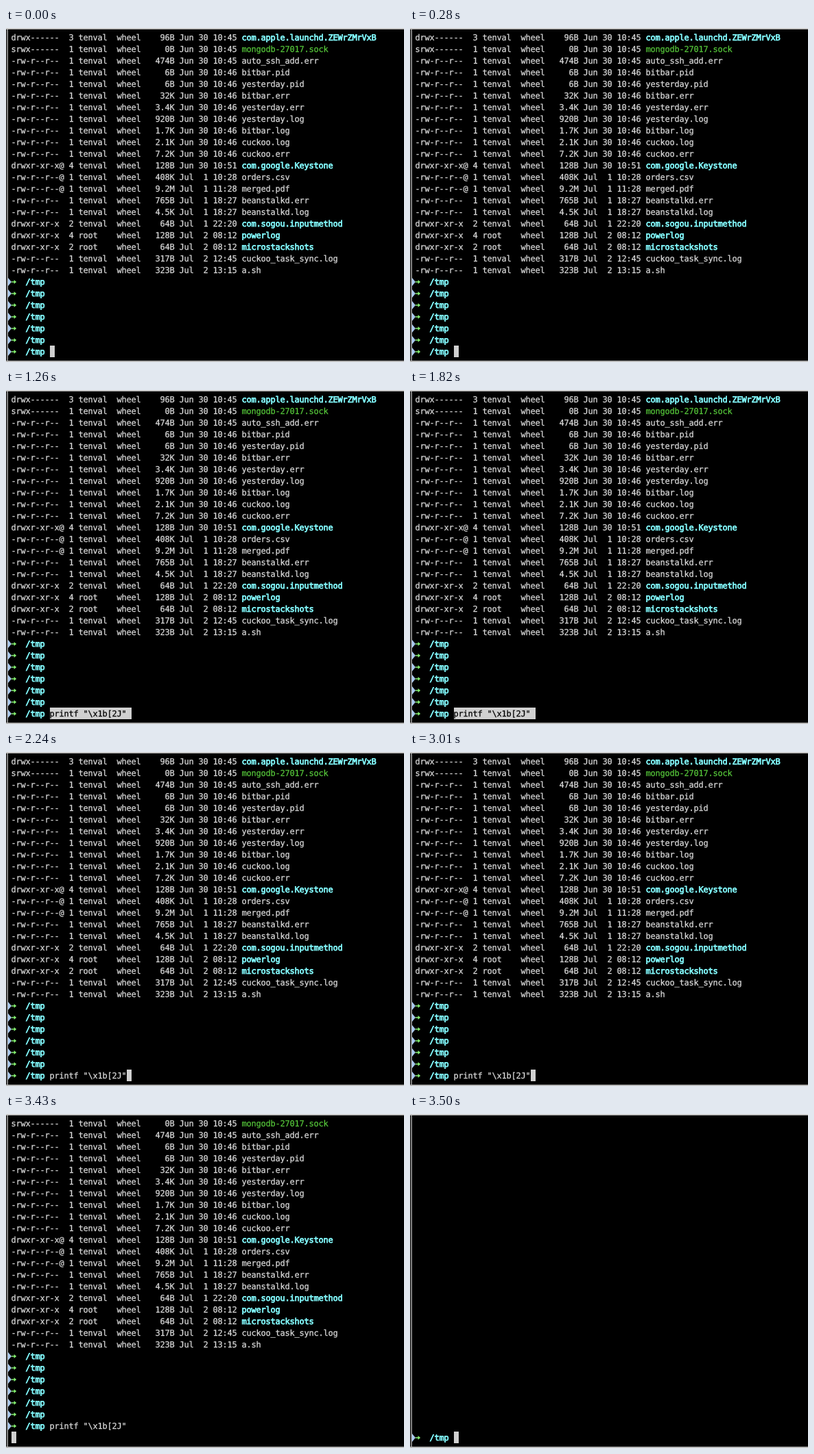
An HTML page for the animation above (5.11 s loop, 580 by 488 pixels).

```html
<!DOCTYPE html>
<html lang="en">
<head>
<meta charset="utf-8">
<title>Clearing a terminal</title>
<style>
  html, body { margin: 0; width: 100%; height: 100%; overflow: hidden; background: #000; }
  svg { display: block; width: 580px; height: 488px; }
  text {
    font: 12px "DejaVu Sans Mono", "Liberation Mono", monospace;
    letter-spacing: -.2246px;
    white-space: pre;
    text-rendering: geometricPrecision;
    color: #dadada;
    fill: currentColor;
    stroke: currentColor;
    stroke-width: .25px;
  }
  .dir { color: #84fcff; stroke-width: .75px; }
  .sock { color: #55c53a; }
</style>
</head>
<body>
<svg id="stage" viewBox="0 0 580 488">
  <rect width="580" height="488" fill="#000"/>
  <g id="history"></g>
  <g id="active"></g>
  <rect id="block" height="17" fill="#d0d0d0"/>
  <text id="command"></text>
  <rect width="2" height="488" fill="#3c3c3c"/>
  <rect x="2" width="1" height="488" fill="#b4b4b4"/>
  <rect width="580" height="2" fill="#c6c6c6"/>
  <rect y="486" width="580" height="2" fill="#b4b4b4"/>
</svg>
<script>
const LOOP = 5110, PASTE = 910, SETTLE = 1960, ENTER = 3430, CLEAR = 3500;
const CELL = 7, LINE = 17, LEFT = 8, LAST = 27;
const COMMAND = 'printf "\\x1b[2J"';
const USER = 'tenval';
const FILE = '-rw-r--r--', FILE_X = FILE + '@', DIR = 'drwxr-xr-x';

// permissions, links, owner, size, date, name, class
const files = [
  ['drwx------', 3, USER, '96B', 'Jun 30 10:45', 'com.apple.launchd.ZEWrZMrVxB', 'dir'],
  ['srwx------', 1, USER, '0B', 'Jun 30 10:45', 'mongodb-27017.sock', 'sock'],
  [FILE, 1, USER, '474B', 'Jun 30 10:45', 'auto_ssh_add.err'],
  [FILE, 1, USER, '6B', 'Jun 30 10:46', 'bitbar.pid'],
  [FILE, 1, USER, '6B', 'Jun 30 10:46', 'yesterday.pid'],
  [FILE, 1, USER, '32K', 'Jun 30 10:46', 'bitbar.err'],
  [FILE, 1, USER, '3.4K', 'Jun 30 10:46', 'yesterday.err'],
  [FILE, 1, USER, '920B', 'Jun 30 10:46', 'yesterday.log'],
  [FILE, 1, USER, '1.7K', 'Jun 30 10:46', 'bitbar.log'],
  [FILE, 1, USER, '2.1K', 'Jun 30 10:46', 'cuckoo.log'],
  [FILE, 1, USER, '7.2K', 'Jun 30 10:46', 'cuckoo.err'],
  [DIR + '@', 4, USER, '128B', 'Jun 30 10:51', 'com.google.Keystone', 'dir'],
  [FILE_X, 1, USER, '408K', 'Jul  1 10:28', 'orders.csv'],
  [FILE_X, 1, USER, '9.2M', 'Jul  1 11:28', 'merged.pdf'],
  [FILE, 1, USER, '765B', 'Jul  1 18:27', 'beanstalkd.err'],
  [FILE, 1, USER, '4.5K', 'Jul  1 18:27', 'beanstalkd.log'],
  [DIR, 2, USER, '64B', 'Jul  1 22:20', 'com.sogou.inputmethod', 'dir'],
  [DIR, 4, 'root', '128B', 'Jul  2 08:12', 'powerlog', 'dir'],
  [DIR, 2, 'root', '64B', 'Jul  2 08:12', 'microstackshots', 'dir'],
  [FILE, 1, USER, '317B', 'Jul  2 12:45', 'cuckoo_task_sync.log'],
  [FILE, 1, USER, '323B', 'Jul  2 13:15', 'a.sh']
];

const $ = id => document.getElementById(id);
const colX = col => LEFT + col * CELL;
const textX = col => colX(col) - .4;
const rowTop = row => 5 + row * LINE;
const baseline = row => rowTop(row) + 13;

function add(parent, tag, attrs, content = '') {
  const el = document.createElementNS('http://www.w3.org/2000/svg', tag);
  for (const key in attrs) el.setAttribute(key, attrs[key]);
  el.textContent = content;
  parent.append(el);
  return el;
}

function addText(parent, col, row, content, cls = '') {
  add(parent, 'text', { x: textX(col), y: baseline(row), class: cls }, content);
}

function addFile([mode, links, owner, size, date, name, cls], row) {
  const line = add($('history'), 'g', {});
  const info = `${mode.padEnd(11)} ${links} ${owner.padEnd(8)}wheel${size.padStart(7)} ${date}`;
  addText(line, 0, row, info);
  addText(line, 48, row, name, cls);
  return line;
}

function addPrompt(parent, row) {
  const y = rowTop(row) + 9;
  add(parent, 'path', { d: `M3 ${y - 6}L8 ${y}L3 ${y + 6}z`, fill: '#a9c8ee' });
  add(parent, 'path', {
    d: `M8 ${y - .8}h3.6v-2.1l3.6 2.9l-3.6 2.9v-2.1h-3.6z`, fill: '#84f070'
  });
  addText(parent, 3, row, '/tmp', 'dir');
}

const lines = files.map(addFile);
for (let row = files.length; row < LAST; row++) addPrompt($('history'), row);
addPrompt($('active'), LAST);
$('command').textContent = COMMAND;
$('command').setAttribute('x', textX(8));
$('command').setAttribute('y', baseline(LAST));
$('block').setAttribute('y', rowTop(LAST));

const show = (el, on) => el.setAttribute('visibility', on ? 'visible' : 'hidden');

function draw(t) {
  const cleared = t >= CLEAR;
  const scrolled = t >= ENTER && !cleared;
  const typed = t >= PASTE && !cleared;
  const marked = t >= PASTE && t < SETTLE;
  const shift = `translate(0 ${scrolled ? -LINE : 0})`;
  for (const id of ['history', 'active', 'command']) $(id).setAttribute('transform', shift);

  $('history').setAttribute('display', cleared ? 'none' : 'inline');
  show(lines[0], !scrolled);
  show($('command'), typed);
  $('command').style.color = marked ? '#000' : '';

  const col = scrolled ? 0 : typed && !marked ? 8 + COMMAND.length : 8;
  $('block').setAttribute('x', colX(col));
  $('block').setAttribute('width', CELL * (marked ? COMMAND.length + 1 : 1));
}

const start = performance.now();
function tick() {
  draw((performance.now() - start) % LOOP);
  requestAnimationFrame(tick);
}
draw(0);
requestAnimationFrame(tick);
</script>
</body>
</html>
```
